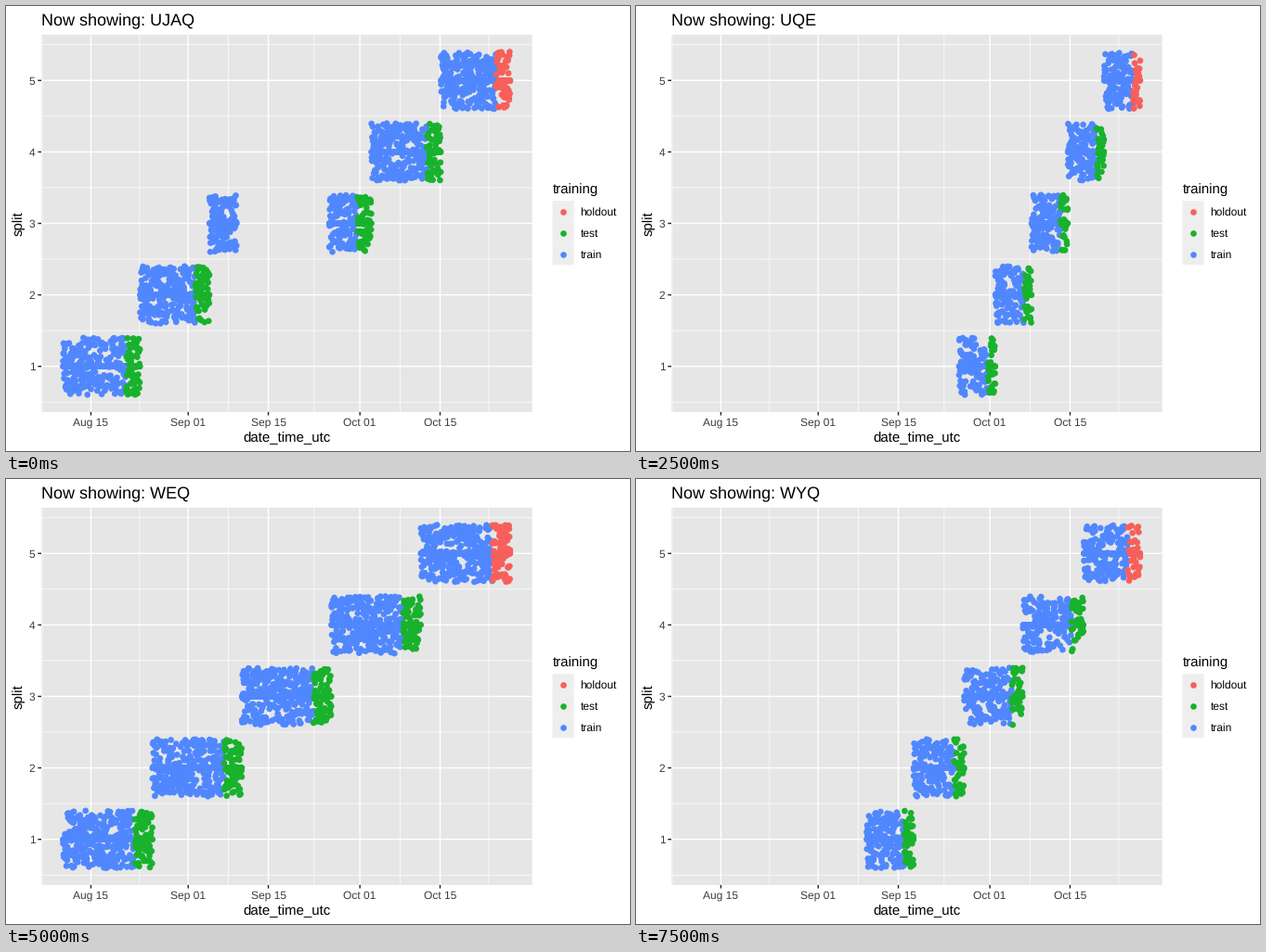
Animation, 672 px wide and 480 px high, one loop 8 s. Source, as a matplotlib script:

```python
import numpy as np
import matplotlib.pyplot as plt
from matplotlib.animation import FuncAnimation
from matplotlib.patches import Rectangle

plt.rcParams["font.family"] = "Liberation Sans"
plt.rcParams["text.hinting"] = "no_hinting"
plt.rcParams["text.hinting_factor"] = 1

W, H, DPI = 672, 480, 96
LEFT, RIGHT, TOP, BOTTOM = 38, 566.7, 30.9, 437.9
DAY, ROW = 6.165, 77.1           # pixels per day and per split
RED, GREEN, BLUE = "#f7605a", "#18b22d", "#5087ff"
PANEL, KEY, TICK, LABEL = "#e6e6e6", "#eeeeee", "#262626", "#3c3c3c"
DOT = 25

NAMES = ["UJAQ", "UJV", "UQE", "UVKO", "UWJY", "WEQ", "WUJ", "WYQ"]

# Each series: where its hourly record starts, and its thin stretches
# (from, to, share kept). All records end together.
EARLY, MIDDLE, LATE, END = 61.5, 248.5, 348, 543
OUTAGE = (MIDDLE, LATE, 0)
SERIES = [
    (EARLY, [(92, 112, .6), OUTAGE]),
    (EARLY, [(83, 148, .36), OUTAGE, (357, 384, .1), (409, 442, 0)]),
    (LATE, []),
    (LATE, []),
    (EARLY, [(82, 90, 0), (90, 151, .7), (214, 242, .66), OUTAGE,
             (426, 433, 0), (433, END, .85)]),
    (EARLY, []),
    (MIDDLE, [(MIDDLE, 270, .6)]),
    (MIDDLE, []),
    (MIDDLE, [(299, 354, .93), (354, END, .8)]),
]


def row_y(split):
    return 388.7 - ROW * (split - 1)


def build(k):
    """Five equal splits, each a straight row of dots plus a jittered copy."""
    rng = np.random.default_rng(40 + k)
    start, thin = SERIES[k]
    hours = np.arange(start, END, DAY / 24)
    keep = np.ones(len(hours), bool)
    for a, b, share in thin:
        inside = np.flatnonzero((hours >= a) & (hours < b))
        lost = round(len(inside) * (1 - share))
        keep[rng.choice(inside, lost, replace=False)] = False

    x = hours[keep]
    mid, cols = np.empty(len(x)), []
    for s, part in enumerate(np.array_split(np.arange(len(x)), 5), 1):
        mid[part] = row_y(s)
        train = int(len(part) * .8)
        cols += [BLUE] * train + [RED if s == 5 else GREEN] * (len(part) - train)

    settled = mid + rng.uniform(-.4, .4, len(x)) * ROW
    early = settled.copy()
    late = rng.choice(len(x), 6, replace=False)
    early[late] = mid[late] + rng.uniform(-.4, .4, 6) * ROW

    def stack(y):
        return np.column_stack([np.tile(x, 2), np.concatenate([mid, y])])

    return stack(early), stack(settled), cols * 2


scenes = [build(k) for k in range(len(SERIES))]

fig = plt.figure(figsize=(W / DPI, H / DPI), dpi=DPI, facecolor="white")
ax = fig.add_axes([0, 0, 1, 1])
ax.set_xlim(0, W)
ax.set_ylim(H, 0)
ax.axis("off")


def box(x, y, w, h, color):
    ax.add_patch(Rectangle((x, y), w, h, fc=color, lw=0, snap=False, zorder=0))


def line(x0, y0, x1, y1, color="white", px=1.42):
    ax.plot([x0, x1], [y0, y1], color=color, lw=px * .75, snap=False,
            solid_capstyle="butt", zorder=1)


def label(x, y, s, size, color="black", **kw):
    return ax.text(x, y, s, fontsize=size, color=color, va="baseline", **kw)


def day_x(day):
    return 91.4 + day * DAY


box(LEFT, TOP, RIGHT - LEFT, BOTTOM - TOP, PANEL)

# Minor grid halfway between the major lines
ticks = {"Aug 15": 0, "Sep 01": 17, "Sep 15": 31, "Oct 01": 47, "Oct 15": 61}
days = [-17, *ticks.values(), 78]
for a, b in zip(days, days[1:]):
    x = day_x((a + b) / 2)
    line(x, TOP, x, BOTTOM, px=.71)
for s in np.arange(.5, 6):
    line(LEFT, row_y(s), RIGHT, row_y(s), px=.71)

for name, day in ticks.items():
    x = day_x(day)
    line(x, TOP, x, BOTTOM)
    line(x, BOTTOM, x, BOTTOM + 3.67, TICK)
    label(x, 453, name, 8.8, LABEL, ha="center")
for s in range(1, 6):
    y = row_y(s)
    line(LEFT, y, RIGHT, y)
    line(LEFT - 3.67, y, LEFT, y, TICK)
    label(31.4, y + 4.2, str(s), 8.8, LABEL, ha="right")

label((LEFT + RIGHT) / 2, 469.6, "date_time_utc", 11, ha="center")
label(17.8, (TOP + BOTTOM) / 2, "split", 11, ha="center",
      rotation=90, rotation_mode="anchor")

label(588.3, 202, "training", 11)
for i, (name, color) in enumerate(zip(["holdout", "test", "train"], [RED, GREEN, BLUE])):
    y = 210.2 + 23.04 * i
    box(588.5, y, 23.04, 23.04, KEY)
    ax.scatter([600], [y + 11.5], s=DOT, c=color, linewidths=0)
    label(618.5, y + 15.7, name, 8.8)

title = label(LEFT - .5, 20, "", 13.2)
dots = ax.scatter([], [], s=DOT, linewidths=0, zorder=3)


def draw(i):
    # dots switch one step ahead of the title
    early, settled, cols = scenes[(i + 1) // 2]
    dots.set_offsets(early if i % 2 else settled)
    dots.set_facecolors(cols)
    title.set_text("Now showing: " + NAMES[i // 2])
    return dots, title


anim = FuncAnimation(fig, draw, frames=16, interval=500, repeat=True,
                     repeat_delay=0, init_func=lambda: draw(0), blit=False)
plt.show()
```
